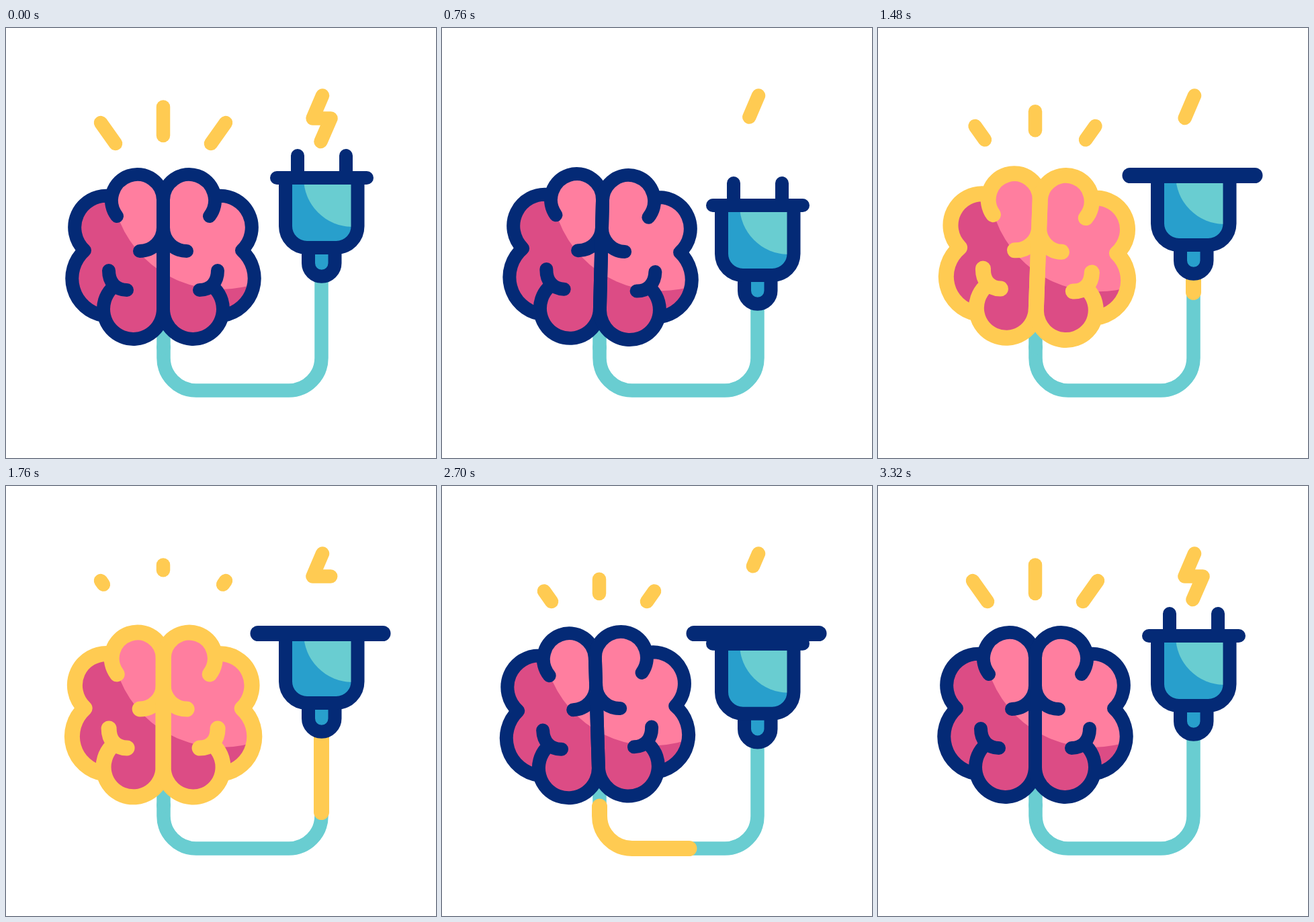
Write an HTML page that moves like this. It is 640 px wide and 640 px high and loops after 3.6 s.

```html
<!DOCTYPE html>
<html lang="en">
<head>
<meta charset="utf-8">
<title>Brain power</title>
<style>
  html, body { margin: 0; width: 100%; height: 100%; overflow: hidden; background: #fff; }
  svg { display: block; width: 100vw; height: 100vh; }
  .line { fill: none; stroke-linecap: round; stroke-linejoin: round; stroke-width: 20; }
  .navy { stroke: #042a76; }
  .teal { stroke: #69cdd1; }
  .gold { stroke: #ffcb52; }
  .spark { stroke-width: 20.5; }
  .wide { stroke-width: 23; }
</style>
</head>
<body>
<svg viewBox="0 0 640 640">
  <defs>
    <path id="halfFill" d="M234 256.5A38.5 38.5 0 0 0 157 252L152 250A47 47 0 0 0 117 331A56 56 0 0 0 145 428V418.5A44.5 44.5 0 0 0 234 418.5Z"/>
    <path id="halfLine" d="M234 418.5V256.5A38.5 38.5 0 1 0 165 280
      M154 250A47 47 0 0 0 117 331A56 56 0 0 0 145 428
      M234 418.5A44.5 44.5 0 1 1 157 388
      M153 361C153 378 163 390 180 390
      M199 332A35 35 0 0 0 234 297"/>
    <g id="brainLine">
      <use href="#halfLine"/>
      <use href="#halfLine" transform="matrix(-1 0 0 1 468 0)"/>
    </g>
    <path id="cable" pathLength="1" d="M469.5 360V491A48.5 48.5 0 0 1 421 539.5H283A48.5 48.5 0 0 1 234.5 491V474"/>
    <path id="cup" d="M416 223V295a32 32 0 0 0 32 32H491.5a32 32 0 0 0 32 -32V223Z"/>
    <clipPath id="brainClip">
      <use href="#halfFill"/>
      <use href="#halfFill" transform="matrix(-1 0 0 1 468 0)"/>
    </clipPath>
    <clipPath id="cupClip"><use href="#cup"/></clipPath>
    <clipPath id="socketClip"><rect y="219" width="640" height="421"/></clipPath>
  </defs>

  <use href="#cable" class="line teal" style="stroke-width:20.5"/>
  <path class="line teal" style="stroke-width:20.5" d="M234.5 476V440"/>
  <use href="#cable" id="pulse" class="line gold wide"/>

  <g id="brain">
    <g clip-path="url(#brainClip)">
      <rect x="80" y="200" width="310" height="280" fill="#dc4c85"/>
      <circle cx="320" cy="226" r="163" fill="#ff7e9f"/>
    </g>
    <use href="#brainLine" class="line navy"/>
    <g id="glow"><use href="#brainLine" class="line gold wide"/></g>
  </g>

  <g id="socketMask">
    <g id="plug">
      <path class="line navy" d="M450 327V350a19.75 19.75 0 0 0 39.5 0V327" style="fill:#289fcc"/>
      <path class="line navy" d="M434 190V223M506 190V223"/>
      <use href="#cup" fill="#289fcc"/>
      <circle cx="516" cy="223" r="73" fill="#69cdd1" clip-path="url(#cupClip)"/>
      <use href="#cup" class="line navy"/>
      <path class="line navy" d="M403 223H537"/>
    </g>
  </g>
  <path id="socket" class="line navy wide"/>

  <g class="line gold spark">
    <path class="ray" pathLength="1" d="M163 172L141 141"/>
    <path class="ray" pathLength="1" d="M234 160V117.5"/>
    <path class="ray" pathLength="1" d="M305 172L327 141"/>
    <path id="bolt" pathLength="1" d="M471 100.5L456.5 134.5H483.5L468.5 169"/>
  </g>
</svg>
<script>
const LOOP = 3600;
const $ = id => document.getElementById(id);
const rays = document.querySelectorAll('.ray');

const linear = p => p;
const smooth = p => p * p * (3 - 2 * p);
const sine = p => (1 - Math.cos(Math.PI * p)) / 2;

// Keys are [time, value] pairs; the value holds outside their range.
function track(t, ease, ...keys) {
  if (t <= keys[0][0]) return keys[0][1];
  for (let i = 1; i < keys.length; i++) {
    const [t0, a] = keys[i - 1], [t1, b] = keys[i];
    if (t < t1) return a + (b - a) * ease((t - t0) / (t1 - t0));
  }
  return keys[keys.length - 1][1];
}

// Shows only the part of a path between two fractions of its length.
function trim(el, from, to) {
  const shown = to - from > 0.0005;
  el.style.display = shown ? '' : 'none';
  if (!shown) return;
  el.style.strokeDasharray = `${to - from} 9`;
  el.style.strokeDashoffset = -from;
}

function drawBrain(t) {
  const angle = track(t, sine, [220, 0], [1253, 2.7], [2287, -2.7], [3320, 0]);
  $('brain').setAttribute('transform', `rotate(${angle} 234 455)`);
  $('glow').setAttribute('opacity', track(t, linear, [960, 0], [1100, 1], [2420, 1], [2620, 0]));
}

function drawPlug(t) {
  const y = track(t, smooth, [220, 0], [740, 41], [760, 41], [1200, -4],
    [2530, -4], [2960, 41], [3320, 0]);
  $('plug').setAttribute('transform', `translate(0 ${y})`);

  const plugged = t >= 760 && t < 2960;
  $('socketMask').setAttribute('clip-path', plugged ? 'url(#socketClip)' : 'none');

  const half = 93 * track(t, smooth, [780, 0], [1160, 1], [2720, 1], [2960, 0]);
  $('socket').style.display = half > 0.1 ? '' : 'none';
  $('socket').setAttribute('d', `M${468 - half} 219.5H${468 + half}`);
}

function drawSparks(t) {
  trim($('pulse'),
    track(t, linear, [2172, 0], [3063, 1]),
    track(t, linear, [1380, 0], [2710, 1]));

  let from, to;
  if (t < 1100) {
    from = track(t, linear, [220, 0], [700, 1]);
    to = 1;
  } else if (t < 2400) {
    from = track(t, linear, [1400, 0], [1840, 1]);
    to = track(t, linear, [1120, 0], [1550, 1]);
  } else {
    from = 0;
    to = track(t, linear, [2480, 0], [2920, 1]);
  }
  rays.forEach(ray => trim(ray, from, to));

  if (t < 2530) {
    trim($('bolt'),
      track(t, linear, [1780, 0], [2500, 1]),
      track(t, t < 1110 ? smooth : linear, [220, 1], [1110, 0.002], [2150, 1]));
  } else {
    trim($('bolt'), 0, track(t, linear, [2550, 0], [3300, 1]));
  }
}

function frame() {
  const t = (performance.now() - start) % LOOP;
  drawBrain(t);
  drawPlug(t);
  drawSparks(t);
  requestAnimationFrame(frame);
}

const start = performance.now();
frame();
</script>
</body>
</html>
```
